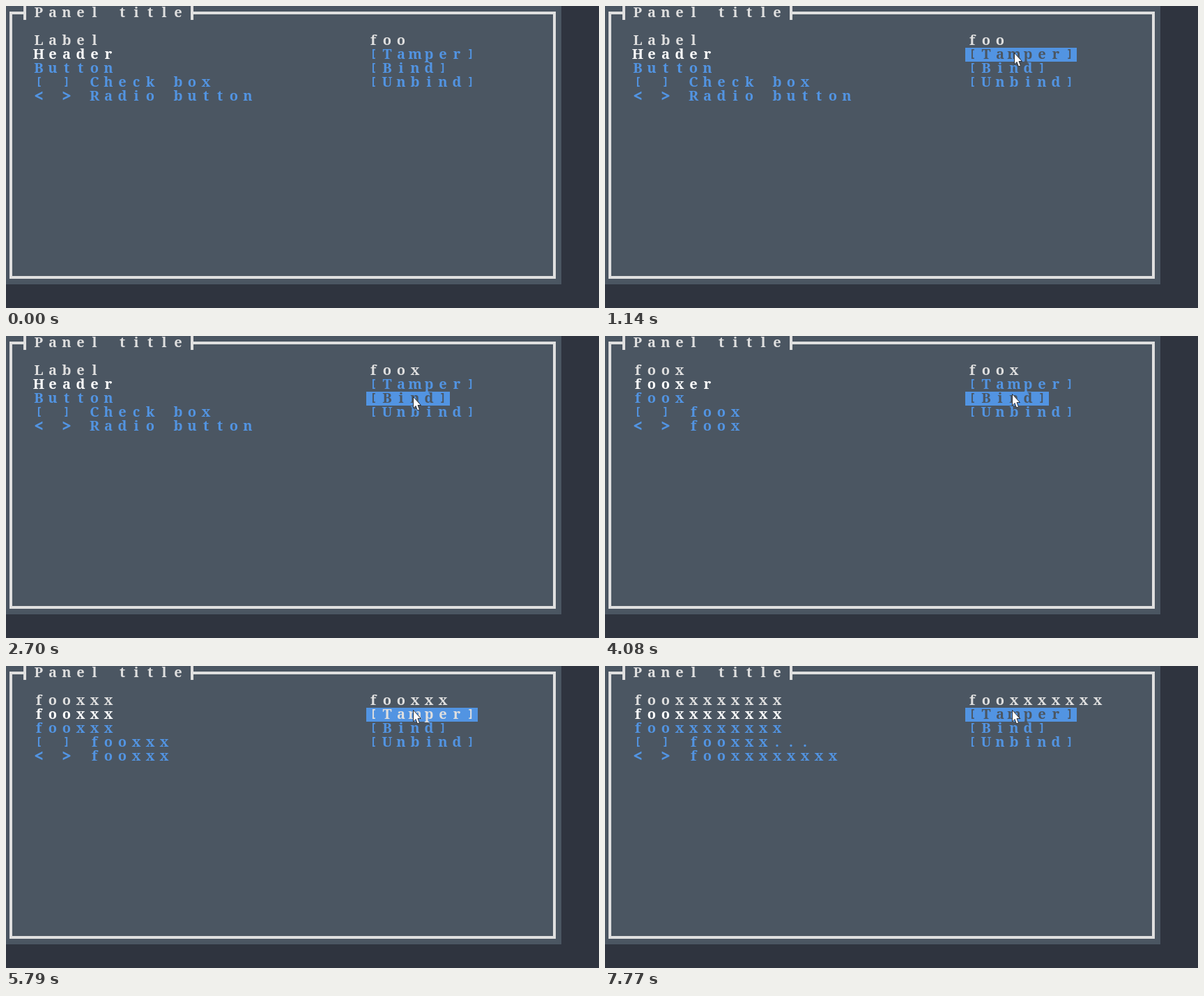
These frames come from a looping animation (851x434 px, 8 s). An HTML page with a canvas:

```html
<!DOCTYPE html>
<html lang="en">
<head>
<meta charset="utf-8">
<title>Panel</title>
<style>
html, body { margin: 0; height: 100%; overflow: hidden; background: #2f343f; }
canvas { display: block; }
</style>
</head>
<body>
<canvas id="stage" width="851" height="434"></canvas>
<script>
const ctx = document.getElementById('stage').getContext('2d');
const LOOP = 8000, TICK = 30, CELL = 20, LEFT = -3;
const SLATE = '#4b5662', LIGHT = '#dfdfdf', WHITE = '#ffffff', BLUE = '#5294e2';

// Pointer tip: time, x, y
const path = [
  [480, 846, 119], [570, 768, 108], [660, 696, 96], [750, 642, 87],
  [870, 607, 68], [990, 592, 59], [1140, 587, 67],
  [2520, 587, 69], [2700, 584, 87],
  [4050, 584, 85], [4350, 584, 63]
];
// Moments when the button goes down and up
const tampers = [[1470, 1590], [4710, 4830], [5190, 5280], [5790, 5910],
  [6120, 6270], [6420, 6570], [6780, 6960], [7650, 7770]];
const bind = [3270, 3360];

const buttons = [
  { text: '[Tamper]', row: 3, clicks: tampers },
  { text: '[Bind]', row: 4, clicks: [bind] },
  { text: '[Unbind]', row: 5, clicks: [] }
];

function rect(x, y, w, h, color) {
  ctx.fillStyle = color;
  ctx.fillRect(x, y, w, h);
}

// One character per terminal cell
function write(text, col, row, color) {
  ctx.fillStyle = color;
  ctx.textAlign = 'center';
  [...text].forEach((ch, i) => {
    let font = 'bold 20px "Noto Serif", serif', base = 16;
    if ('[]'.includes(ch)) {
      font = 'bold 16px "Noto Sans Mono", monospace';
      base = 14;
    } else if ('<>'.includes(ch)) {
      font = 'bold 25px "Noto Sans Mono", monospace';
      base = 18;
    }
    ctx.font = font;
    ctx.fillText(ch, LEFT + (col + i + 0.5) * CELL, row * CELL + base);
  });
}

function tipAt(t) {
  if (t < path[0][0]) return null;
  const next = path.findIndex(p => p[0] > t);
  if (next < 0) return path[path.length - 1].slice(1);
  const [t0, x0, y0] = path[next - 1], [t1, x1, y1] = path[next];
  // Long stretches are rests between moves
  if (t1 - t0 > 500) return [x0, y0];
  const k = (t - t0) / (t1 - t0);
  return [Math.round(x0 + (x1 - x0) * k), Math.round(y0 + (y1 - y0) * k)];
}

function drawPanel() {
  rect(0, 0, 851, 434, '#2f343f');
  rect(0, 0, 797, 400, SLATE);
  rect(5, 8, 4, 384, LIGHT);
  rect(785, 8, 4, 384, LIGHT);
  rect(5, 388, 784, 4, LIGHT);
  rect(5, 8, 20, 4, LIGHT);
  rect(269, 8, 520, 4, LIGHT);
  rect(25, 0, 4, 20, LIGHT);
  rect(265, 0, 4, 20, LIGHT);
  write('Panel title', 2, 0, LIGHT);
}

function drawWidgets(t) {
  const count = tampers.filter(c => t >= c[1]).length;
  const value = 'foo' + 'x'.repeat(count);
  const bound = t >= bind[1];
  const show = text => bound ? value : text;
  // The header keeps old letters that are not overwritten
  const header = bound ? value + 'Header'.slice(value.length) : 'Header';
  const check = value.length > 9 ? value.slice(0, 6) + '...' : value;

  write(show('Label'), 2, 2, LIGHT);
  write(header, 2, 3, WHITE);
  write(show('Button'), 2, 4, BLUE);
  write('[ ] ' + (bound ? check : 'Check box'), 2, 5, BLUE);
  write('< > ' + show('Radio button'), 2, 6, BLUE);
  write(value.slice(0, 10), 26, 2, LIGHT);
}

function drawButtons(t, tip) {
  for (const { text, row, clicks } of buttons) {
    const x = 517, y = row * CELL, w = text.length * CELL;
    const hover = tip && tip[0] >= x && tip[0] < x + w && tip[1] >= y && tip[1] < y + CELL;
    const down = clicks.some(([a, b]) => t >= a && t < b);
    if (hover) rect(x, y, w, CELL, BLUE);
    write(text, 26, row, down ? LIGHT : hover ? SLATE : BLUE);
  }
}

function drawPointer([x, y]) {
  ctx.save();
  ctx.translate(x, y);
  const arrow = new Path2D('M.5 .5V17L4 13.5 6.5 20 9.5 18.8 7 12.5H11.5Z');
  ctx.fillStyle = WHITE;
  ctx.strokeStyle = '#2b303a';
  ctx.lineWidth = 1;
  ctx.fill(arrow);
  ctx.stroke(arrow);
  ctx.restore();
}

function frame(now) {
  const t = Math.floor(now % LOOP / TICK) * TICK;
  const tip = tipAt(t);
  drawPanel();
  drawWidgets(t);
  drawButtons(t, tip);
  if (tip) drawPointer(tip);
  requestAnimationFrame(frame);
}
requestAnimationFrame(frame);
</script>
</body>
</html>
```
